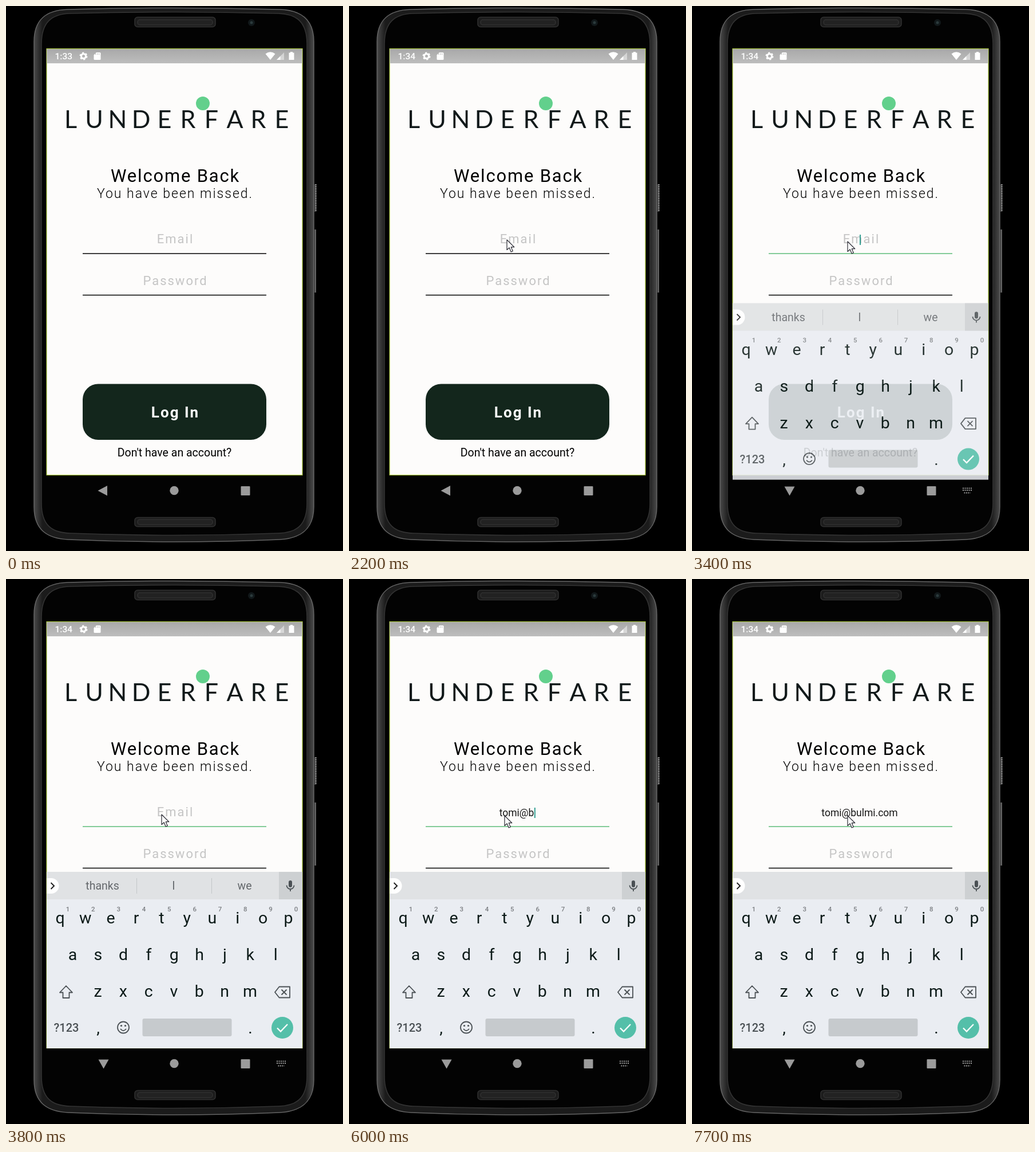
Write an HTML page that moves like this. It is 589 by 951 pixels and loops after 8000 ms.

```html
<!DOCTYPE html>
<html lang="en">
<head>
<meta charset="utf-8">
<title>Login screen</title>
<style>
html, body { margin: 0; width: 100%; height: 100%; overflow: hidden; background: #000; }
svg { display: block; width: 589px; height: 951px; font-family: Roboto, sans-serif; }
.mid { text-anchor: middle; }
.hint { font-size: 22px; letter-spacing: 2px; fill: #c5c5c5; }
.word { font-size: 19.5px; fill: #64686c; }
.key { font-size: 28.5px; fill: #0c1a18; }
.digit { font-size: 11.5px; font-weight: 500; fill: #7b7e82; }
.icon { fill: none; stroke: #4a5054; stroke-width: 1.8; stroke-linejoin: round; }
</style>
</head>
<body>
<svg viewBox="0 0 589 951">
  <defs>
    <linearGradient id="bar" x2="0" y2="1">
      <stop stop-color="#a9a9a9"/><stop offset="1" stop-color="#bdbdbd"/>
    </linearGradient>
    <linearGradient id="rim" x2="1" y2="0">
      <stop stop-color="#4a4a4a"/><stop offset=".03" stop-color="#1b1b1b"/>
      <stop offset=".97" stop-color="#1b1b1b"/><stop offset="1" stop-color="#4a4a4a"/>
    </linearGradient>
  </defs>
  <rect width="589" height="951"/>

  <g id="phone">
    <path d="M537 311h4.500v48h-4.500z" fill="#333"/>
    <path d="M541.500 311v48" stroke="#b5b5b5" stroke-width="2" stroke-dasharray="2 1"/>
    <path d="M537 390h3.500v110h-3.500z" fill="#333"/>
    <path d="M541 390v110" stroke="#999" stroke-width="1.300"/>
    <path d="M49 62C49 22 72 7 108 6Q294 1 478 6C514 7 538 22 538 62V874C538 914 514 929 478 931Q294 939 108 931C72 929 49 914 49 874Z"
      fill="url(#rim)" stroke="#646464" stroke-width="1.500"/>
    <path d="M62 66C62 28 80 14 112 13Q294 8 476 13C508 14 526 28 526 66V868C526 906 508 919 476 920Q294 927 112 920C80 919 62 906 62 868Z"
      fill="#030303" stroke="#333" stroke-width="1.600"/>
    <g fill="#1c1c1c" stroke="#303030" stroke-width="1.500">
      <rect x="225" y="19.500" width="141" height="17" rx="5"/>
      <rect x="230" y="24" width="131" height="9" rx="4" fill="#222"/>
      <rect x="225" y="892.500" width="141" height="16" rx="5"/>
      <rect x="230" y="896" width="131" height="9" rx="4" fill="#222"/>
    </g>
    <circle cx="429" cy="29" r="6" fill="#11181a"/>
    <circle cx="429" cy="29" r="2.500" fill="#2b3a3c"/>
  </g>

  <g id="screen">
    <rect x="71" y="74.500" width="447" height="744" fill="#fdfcfb" stroke="#a9c63b" stroke-width="1.200"/>
    <rect x="71.500" y="75" width="446" height="25" fill="url(#bar)"/>
    <g fill="#fff">
      <text id="clock" x="85.500" y="93" font-size="15.500" font-weight="500"></text>
      <circle cx="135.500" cy="87.500" r="4" fill="none" stroke="#fff" stroke-width="3"/>
      <circle cx="135.500" cy="87.500" r="6" fill="none" stroke="#fff" stroke-width="2" stroke-dasharray="3.140"/>
      <path d="M158 81h6q1.500 0 1.500 1.500v10q0 1.500-1.500 1.500h-9q-1.500 0-1.500-1.500V85.500z"/>
      <path d="M156.500 85v-2.500M159.500 85v-2.500M162.500 85v-2.500" stroke="#b0b0b0"/>
      <path d="M453.500 83.500Q462 77 470.500 83.500L462 94z"/>
      <path d="M486 81v13h-13z" opacity=".45"/><path d="M479.500 87.500v6.500h-6.500z"/>
      <path d="M497 80h4v1.500h2.500V94h-9V81.500h2.500z"/>
    </g>
    <circle cx="344" cy="170" r="12" fill="#62d08c"/>
    <text id="brand" class="mid" y="213" font-size="43" font-family="Lato, sans-serif" fill="#11191a"></text>
    <text class="mid" x="296" y="307" font-size="31" letter-spacing="1.800">Welcome Back</text>
    <text class="mid" x="295.500" y="335" font-size="23" font-weight="300" letter-spacing="2">You have been missed.</text>
    <text id="hint" class="mid hint" x="296" y="414">Email</text>
    <text id="typed" class="mid" x="293" y="414" font-size="17.500" fill="#161616"></text>
    <rect id="caret" y="399" width="2" height="18" fill="#369f92"/>
    <path id="line" d="M134 432H455" stroke-width="1.400"/>
    <text class="mid hint" x="296" y="487">Password</text>
    <path d="M134 504.500H455" stroke="#000" stroke-width="1.400"/>
    <rect x="134" y="659.500" width="321" height="97.500" rx="27" fill="#13261c"/>
    <text class="mid" x="296" y="718" font-size="26" font-weight="700" letter-spacing="2" fill="#fff">Log In</text>
    <text class="mid" x="294.500" y="786" font-size="19.500">Don't have an account?</text>
  </g>

  <g fill="#9b9b9b">
    <path id="back"/>
    <circle cx="294" cy="845.500" r="7.700"/>
    <rect x="410.500" y="838" width="16" height="16" rx="1"/>
    <path id="switcher" d="M473 841.500h16M473 845h16M475.500 849.500h11" stroke="#9b9b9b" stroke-width="2" stroke-dasharray="2 1.500"/>
  </g>

  <g id="board">
    <rect x="71" y="511" width="447" height="308" fill="#eaedf2"/>
    <rect x="71" y="511" width="447" height="48" fill="#e0e2e4"/>
    <rect x="477" y="511" width="41" height="48" fill="#cdd0d2"/>
    <path d="M71 522h8a13.500 13.500 0 0 1 0 27h-8z" fill="#fff"/>
    <path d="M78.500 530l5.500 5.500-5.500 5.500" fill="none" stroke="#222" stroke-width="2"/>
    <path id="dividers" d="M228.500 522v27M359.500 522v27" stroke="#c3c6c8"/>
    <rect x="494" y="526" width="6" height="12" rx="3" fill="#4a5054"/>
    <path class="icon" d="M490.500 534.500a6.500 6.500 0 0 0 13 0M497 541v4"/>
    <g id="general" class="mid word">
      <text x="168.500" y="542">thanks</text><text x="293" y="542">I</text><text x="417" y="542">we</text>
    </g>
    <g id="names" class="mid word">
      <text x="168.500" y="542">tomi</text>
      <text x="293" y="542" font-weight="700" fill="#000" style="font-size:19px">Tomi</text>
      <text x="417" y="530" style="font-size:17.500px">tomi</text>
      <text x="417" y="549" style="font-size:13.200px">@bulmi.com</text>
    </g>
    <g id="keys" class="mid"></g>
    <path class="icon" d="M105 710l-11 11.500h5.500v9.500h11v-9.500h5.500z"/>
    <path class="icon" d="M477.500 711.500h18.500v19h-18.500l-7.500-9.500zM481.500 716.500l9 9M490.500 716.500l-9 9"/>
    <text class="mid" x="105.500" y="790" font-size="20" font-weight="500" fill="#4a5054">?123</text>
    <circle class="icon" cx="205" cy="782.500" r="10"/>
    <path class="icon" d="M200 785q5 6 10 0"/>
    <circle cx="201.500" cy="779.500" r="1.600" fill="#4a5054"/><circle cx="208.500" cy="779.500" r="1.600" fill="#4a5054"/>
    <rect x="238.500" y="767" width="156" height="31" rx="3" fill="#c6cacd"/>
    <circle cx="483" cy="783" r="19" fill="#54bfa9"/>
    <path d="M474 783.500l6 6 12-12.500" fill="none" stroke="#fff" stroke-width="2.300"/>
  </g>

  <path id="mouse" d="M0 0V17.500L4.200 13.800L7.200 21L10.300 19.700L7.300 12.700H12.800Z"
    fill="#fff" stroke="#2a2a33" stroke-width="1.200" stroke-linejoin="round"/>
</svg>
<script>
const LOOP = 8000;
const $ = id => document.getElementById(id);
const show = (id, on) => $(id).setAttribute('visibility', on ? 'visible' : 'hidden');
const set = (id, name, value) => $(id).setAttribute(name, value);

const brand = 'LUNDERFARE';
$('brand').textContent = brand;
set('brand', 'x', [...brand].map((_, i) => 113 + i * 41).join(' '));

const label = (text, x, y, cls) => `<text class="${cls}" x="${x}" y="${y}">${text}</text>`;
const row = (chars, x, y, cls = 'key') =>
  [...chars].map((c, i) => label(c, x + i * 44.33, y, cls)).join('');
$('keys').innerHTML = row('qwertyuiop', 94.5, 601) + row('1234567890', 108, 579.5, 'digit') +
  row('asdfghjkl', 116.5, 665) + row('zxcvbnm', 160.5, 729) +
  label(',', 161, 793, 'key') + label('.', 427, 793, 'key');

// [time, typed text length]
const email = 'tomi@bulmi.com';
const strokes = [[4600, 4], [5400, 5], [5800, 6], [6100, 7], [6300, 8], [6500, 9],
  [6700, 10], [6900, 11], [7000, 12], [7100, 13], [7300, 14]];

// [time, x, y]
const path = [[1000, 232, 452], [1200, 242, 431], [1500, 246, 428], [2100, 276, 408],
  [2400, 276, 408], [2800, 272, 411], [5600, 272, 411], [5800, 272, 413], [LOOP, 272, 413]];

function mouseAt(t) {
  const i = Math.max(1, path.findIndex(p => p[0] > t));
  const [a, b] = [path[i - 1], path[i]];
  const u = Math.max(0, (t - a[0]) / (b[0] - a[0]));
  const k = u * u * (3 - 2 * u);
  return [a[1] + (b[1] - a[1]) * k, a[2] + (b[2] - a[2]) * k];
}

function draw(t) {
  $('clock').textContent = t < 1000 ? '1:33' : '1:34';

  const focused = t >= 3100;
  const last = strokes.filter(s => s[0] <= t).pop();
  const typed = last ? email.slice(0, last[1]) : '';
  $('typed').textContent = typed;
  show('hint', !typed);
  set('line', 'stroke', focused ? '#5cbd78' : '#000');
  const blink = last ? (t - last[0]) % 1000 < (last[1] === email.length ? 400 : 500) : (t - 3100) % 1000 < 500;
  show('caret', focused && blink);
  set('caret', 'x', typed ? 293.5 + $('typed').getComputedTextLength() / 2 : 293);

  const opened = t >= 3300;
  const u = Math.min(1, Math.max(0, (t - 3300) / 200));
  const rest = (1 - u) ** 2;
  show('board', opened);
  set('board', 'transform', `translate(0 ${31 * rest})`);
  set('board', 'opacity', 1 - rest ** 1.45);
  show('switcher', opened);
  set('back', 'd', opened ? 'M161.500 838.500h18l-9 16z' : 'M177 837v17.500l-16.500-8.750z');

  const phase = !opened ? '' : t < 4300 ? 'general' : t < 5400 ? 'names' : '';
  $('general').style.display = phase === 'general' ? '' : 'none';
  $('names').style.display = phase === 'names' ? '' : 'none';
  $('dividers').style.display = phase ? '' : 'none';

  show('mouse', t >= 1000);
  set('mouse', 'transform', `translate(${mouseAt(t)})`);
}

const start = performance.now();
function tick() {
  draw((performance.now() - start) % LOOP);
  requestAnimationFrame(tick);
}
tick();
</script>
</body>
</html>
```
